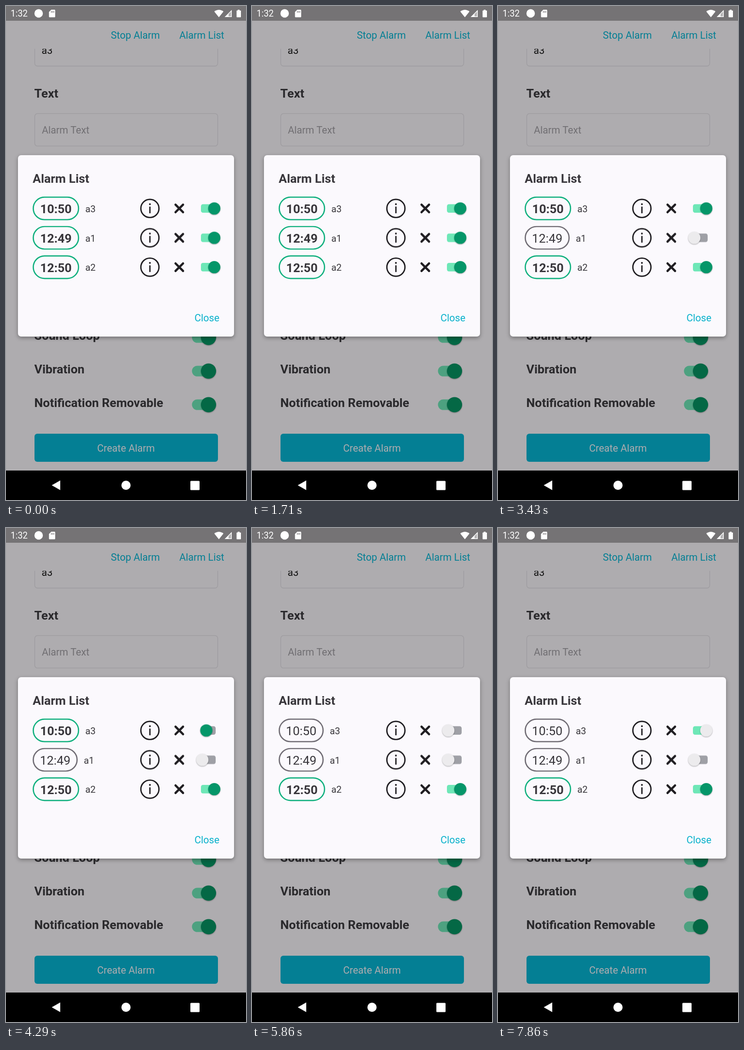
Write an HTML page that moves like this. It is 522 px wide and 1073 px high and loops after 8 s.

```html
<!DOCTYPE html>
<html lang="en">
<head>
<meta charset="utf-8">
<title>Alarm list</title>
<style>
  html, body { margin: 0; width: 100%; height: 100%; overflow: hidden; background: #000; }
  svg { display: block; width: 100%; height: 100%; }
  text { font-family: Roboto, "Noto Sans", sans-serif; font-size: 21.57px; }
  .bold { font-size: 26.65px; font-weight: 700; }
  .time { font-size: 26.65px; }
  .label { font-size: 20.3px; }
  .mid { text-anchor: middle; }
  .page .bold { fill: #2a292c; }
  .box { fill: none; stroke: #9d9b9f; stroke-width: 1.3; }
  .teal { fill: #047f94; }
  .dialog { fill: #38363b; }
  .pill { fill: none; stroke: #10b07e; stroke-width: 2.7; }
  .off .pill { stroke: #706c74; }
  .off { opacity: 0; }
  .icon { fill: none; stroke: #201e22; }
  .track { fill: #6ee7b7; }
  .thumb { fill: #059669; filter: drop-shadow(0 1.2px 1.2px rgba(0, 0, 0, .35)); }
  .page .track { fill: #4da180; }
  .page .thumb { fill: #046845; }
  .card { fill: #fbf9fd; filter: drop-shadow(0 3px 4px rgba(0, 0, 0, .35)); }

  .a1 *, .a3 * { animation-duration: 8s; animation-iteration-count: infinite; animation-timing-function: step-end; }
  .a1 .on { animation-name: a1-on; }
  .a1 .off { animation-name: a1-off; }
  .a1 .track { animation-name: a1-track; }
  .a1 .thumb { animation-name: a1-thumb; }
  .a1 .slide { animation-name: a1-slide; animation-timing-function: ease-in-out; }
  .a3 .on { animation-name: a3-on; }
  .a3 .off { animation-name: a3-off; }
  .a3 .track { animation-name: a3-track; }
  .a3 .thumb { animation-name: a3-thumb; }
  .a3 .slide { animation-name: a3-slide; animation-timing-function: ease-in-out; }

  /* the knob slides first; its colour and the pill follow later */
  @keyframes a1-on { 0% { opacity: 1 } 35.75%, 100% { opacity: 0 } }
  @keyframes a1-off { 0% { opacity: 0 } 35.75%, 100% { opacity: 1 } }
  @keyframes a1-track { 0% { fill: #6ee7b7 } 25%, 100% { fill: #9fa0a6 } }
  @keyframes a1-thumb { 0% { fill: #059669 } 35.75%, 100% { fill: #ecebed } }
  @keyframes a1-slide { 0%, 25% { transform: none } 28.1%, 100% { transform: translateX(-26px) } }
  @keyframes a3-on { 0% { opacity: 1 } 66.1%, 100% { opacity: 0 } }
  @keyframes a3-off { 0% { opacity: 0 } 66.1%, 100% { opacity: 1 } }
  @keyframes a3-track { 0% { fill: #6ee7b7 } 51.75% { fill: #9fa0a6 } 89.25%, 100% { fill: #6ee7b7 } }
  @keyframes a3-thumb { 0% { fill: #059669 } 66.1%, 100% { fill: #ecebed } }
  @keyframes a3-slide {
    0%, 51.75% { transform: none }
    54.9%, 89.25% { transform: translateX(-26px) }
    92.4%, 100% { transform: none }
  }
</style>
</head>
<body>
<svg viewBox="0 0 522 1073">
  <rect width="522" height="1073" fill="#aeacaf"/>

  <g class="page">
    <clipPath id="scroll"><rect y="93" width="522" height="916"/></clipPath>
    <g clip-path="url(#scroll)">
      <rect class="box" x="62.5" y="60" width="398" height="70.5" rx="6"/>
      <text x="77.5" y="104" fill="#111">a3</text>
    </g>
    <text class="teal" x="228" y="71">Stop Alarm</text>
    <text class="teal" x="377" y="71">Alarm List</text>
    <text class="bold" x="61.5" y="199">Text</text>
    <rect class="box" x="62.5" y="233.7" width="398" height="70.5" rx="6"/>
    <text x="78" y="277" fill="#706e72">Alarm Text</text>
    <g id="options"></g>
    <rect class="teal" x="62" y="929" width="399" height="61" rx="6"/>
    <text class="mid" x="261" y="967.5" fill="#aeacaf">Create Alarm</text>
  </g>

  <g id="status" fill="#fff">
    <rect width="522" height="32" fill="#757375"/>
    <text x="10" y="23" style="font-size:19.3px">1:32</text>
    <circle cx="71" cy="16" r="9.2"/>
    <path d="M98.5 8H105.5Q107 8 107 9.500V23Q107 24.500 105.500 24.500H95Q93.500 24.500 93.500 23V13Z"/>
    <path d="M98.500 11v3.500M101.300 11v3.500M104.100 11v3.500" stroke="#757375" stroke-width="1.300"/>
    <path d="M453 12Q463 4.500 473 12L463 24.500Z"/>
    <path d="M491 8.500V24H475.500Z"/>
    <path d="M489.500 12V22.500H484V17.500Z" fill="#757375" opacity=".55"/>
    <path d="M504 8H508V9.700H510Q511 9.700 511 10.700V23.500Q511 24.500 510 24.500H502.500Q501.500 24.500 501.500 23.500V10.700Q501.500 9.700 502.500 9.700H504Z"/>
  </g>

  <g class="dialog">
    <rect class="card" x="26" y="324" width="470" height="394" rx="7"/>
    <text class="bold" x="58" y="384">Alarm List</text>
    <g id="alarms"></g>
    <text x="410" y="685" fill="#08b1cb">Close</text>
  </g>

  <rect y="1009" width="522" height="64"/>
  <g fill="#fff">
    <path d="M99.500 1041L118 1030.500V1051.500Z"/>
    <circle cx="261" cy="1041" r="10"/>
    <rect x="401" y="1031.500" width="20" height="20" rx="1.500"/>
  </g>
</svg>
<script>
  const byId = id => document.getElementById(id);

  const option = (name, i) => {
    const y = 720 + 73 * i;
    return `<text class="bold" x="61.5" y="${y + 5.3}">${name}</text>
      <rect class="track" x="404.5" y="${y - 11.5}" width="41" height="23" rx="11.5"/>
      <circle class="thumb" cx="440.5" cy="${y}" r="16.5"/>`;
  };

  const pill = (state, width, time, name) => `<g class="${state}">
      <rect class="pill" x="59.3" y="-24.5" width="${width}" height="49" rx="24.5"/>
      <text class="mid ${state === "on" ? "bold" : "time"}" x="${59.3 + width / 2}" y="10.3">${time}</text>
      <text class="label" x="${width + 74}" y="8">${name}</text>
    </g>`;

  const alarm = ([time, name], i) => `<g class="${name}" transform="translate(0 ${439.7 + 63.8 * i})">
      ${pill("on", 98.5, time, name)}
      ${pill("off", 95.3, time, name)}
      <g class="icon" transform="translate(313 0)">
        <circle r="19.7" stroke-width="2.9"/>
        <path d="M0 -4V10.500" stroke-width="3"/>
        <circle cy="-9.300" r="2" fill="#201e22" stroke="none"/>
      </g>
      <path class="icon" d="M368.700 -8.200L385.100 8.200M385.100 -8.200L368.700 8.200" stroke-width="4.800" stroke-linecap="round"/>
      <rect class="track" x="424" y="-9.300" width="32" height="18.600" rx="4.500"/>
      <g class="slide"><circle class="thumb" cx="453" r="13.300"/></g>
    </g>`;

  byId("options").innerHTML = ["Sound Loop", "Vibration", "Notification Removable"].map(option).join("");
  byId("alarms").innerHTML = [["10:50", "a3"], ["12:49", "a1"], ["12:50", "a2"]].map(alarm).join("");
</script>
</body>
</html>
```
